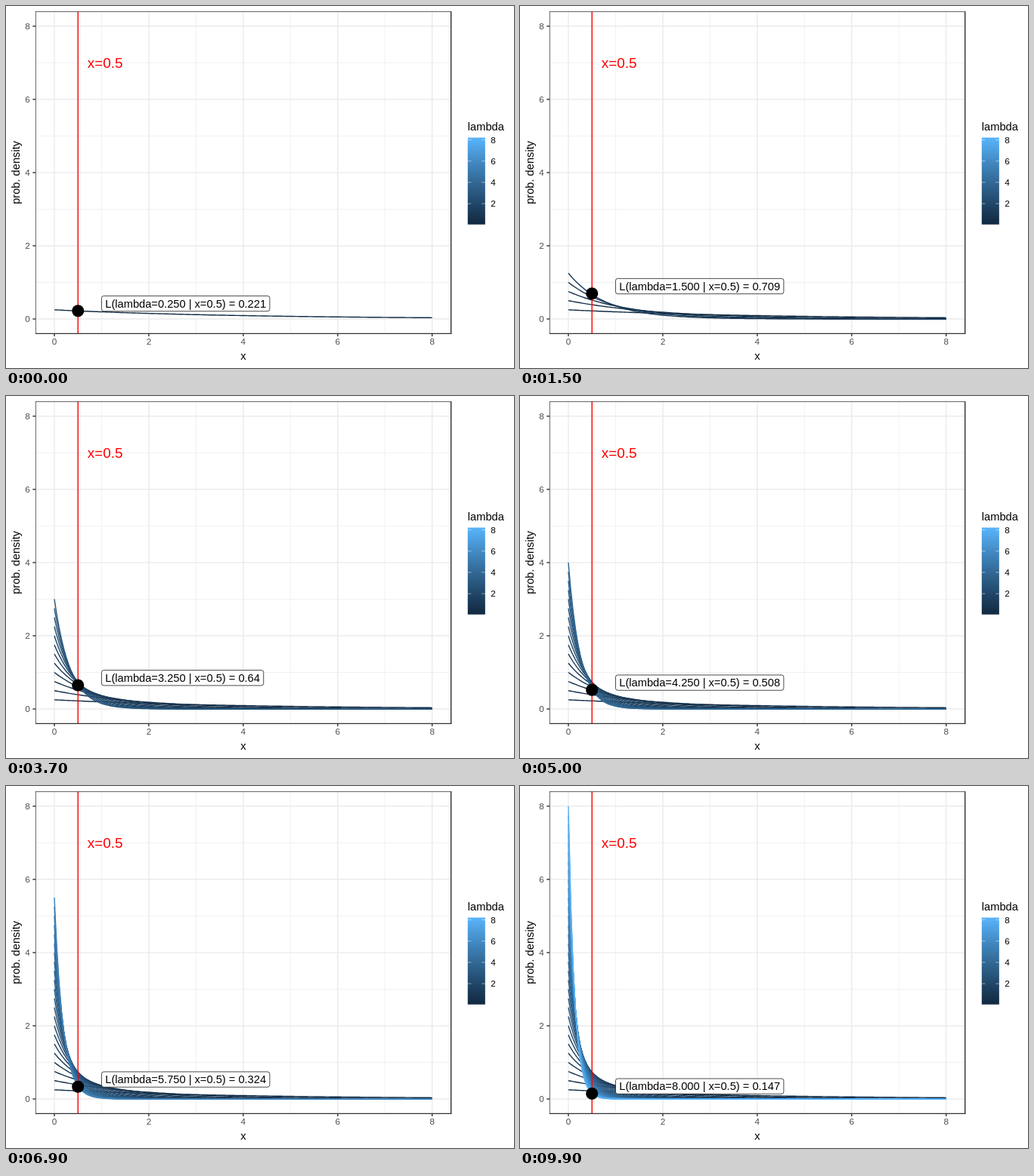
Animation of 672 by 480 pixels, one loop 10000 ms. Source, as an HTML page:

```html
<!DOCTYPE html>
<html>
<head>
<meta charset="utf-8">
<title>Exponential likelihood</title>
<style>
  html, body { margin: 0; width: 100%; height: 100%; overflow: hidden; background: #fff; }
  svg { display: block; }
  text { font-family: "Liberation Sans", Arial, sans-serif; font-size: 14.67px; white-space: pre; }
  .small { font-size: 11.73px; }
</style>
</head>
<body>
<svg id="stage" width="672" height="480" viewBox="0 0 672 480"></svg>
<script>
const stage = document.getElementById('stage');
const LEFT = 39, RIGHT = 588.7, TOP = 7.33, BOTTOM = 434.4;
const px = x => LEFT + (x + 0.4) * (RIGHT - LEFT) / 8.8;
const py = y => BOTTOM - (y + 0.4) * (BOTTOM - TOP) / 8.8;

function add(tag, attrs, parent = stage) {
  const el = document.createElementNS('http://www.w3.org/2000/svg', tag);
  for (const key in attrs) el.setAttribute(key, attrs[key]);
  parent.append(el);
  return el;
}
const line = (x1, y1, x2, y2, stroke, width = 1.42) =>
  add('line', { x1, y1, x2, y2, stroke, 'stroke-width': width });
function write(str, x, y, attrs = {}) {
  const el = add('text', { x, y, ...attrs });
  el.textContent = str;
  return el;
}

// Dark to light blue; the slight dip approximates a Lab blend.
function blue(t) {
  const from = [19, 43, 67], to = [86, 177, 247], dip = [2, 4, 5];
  return `rgb(${from.map((c, i) =>
    Math.round(c + (to[i] - c) * t - 4 * t * (1 - t) * dip[i]))})`;
}

// Grid
for (let v = 1; v < 8; v += 2) {
  line(px(v), TOP, px(v), BOTTOM, '#ebebeb', 0.71);
  line(LEFT, py(v), RIGHT, py(v), '#ebebeb', 0.71);
}
for (let v = 0; v <= 8; v += 2) {
  line(px(v), TOP, px(v), BOTTOM, '#ebebeb');
  line(LEFT, py(v), RIGHT, py(v), '#ebebeb');
}

// One density curve per rate
const STEPS = 31, FRAMES = 100;
const rates = Array.from({ length: STEPS + 1 }, (_, k) => 0.25 * (k + 1));
const starts = rates.map((_, k) => Math.round(k * (FRAMES - 1) / STEPS));
const density = (rate, x) => rate * Math.exp(-rate * x);
const curves = rates.map((rate, k) => {
  let d = '';
  for (let i = 0; i <= 160; i++) {
    const x = i / 20;
    d += `${i ? 'L' : 'M'}${px(x).toFixed(2)} ${py(density(rate, x)).toFixed(2)}`;
  }
  return add('path', { d, fill: 'none', stroke: blue(k / STEPS), 'stroke-width': 1.42 });
});

line(px(0.5), TOP, px(0.5), BOTTOM, '#f00');
const dot = add('circle', { cx: px(0.5), r: 8.05 });
write('x=0.5', px(0.7), 82, { fill: '#f00', style: 'font-size:18.9px' });

const tag = add('g', {});
const box = add('rect', { x: px(1), y: -10.15, height: 20.3, rx: 2.88,
  fill: '#fff', stroke: '#000', 'stroke-width': 0.71 }, tag);
const label = add('text', { x: px(1) + 4.8, y: 5.3 }, tag);

// Border, ticks and titles
line(LEFT, TOP + 0.2, RIGHT, TOP + 0.2, '#333', 0.75);
line(LEFT + 0.4, TOP, LEFT + 0.4, BOTTOM, '#333', 0.75);
line(RIGHT, 7, RIGHT, BOTTOM + 0.6, '#333');
line(LEFT, BOTTOM, RIGHT + 0.6, BOTTOM, '#333');
const axisText = { class: 'small', fill: '#4d4d4d' };
for (let v = 0; v <= 8; v += 2) {
  line(px(v), BOTTOM, px(v), BOTTOM + 3.67, '#333');
  line(LEFT - 3.67, py(v), LEFT, py(v), '#333');
  write(v, px(v), 449.2, { ...axisText, 'text-anchor': 'middle' });
  write(v, 31.9, py(v) + 4.2, { ...axisText, 'text-anchor': 'end' });
}
write('x', (LEFT + RIGHT) / 2, 469, { 'text-anchor': 'middle' });
write('prob. density', 0, 0, { 'text-anchor': 'middle', transform: 'translate(18 220.9) rotate(-90)' });

// Legend
const BAR = { x: 610.8, y: 174.5, width: 23.04, height: 115.2 };
const ramp = add('linearGradient', { id: 'ramp', x1: 0, y1: 1, x2: 0, y2: 0 });
for (let i = 0; i <= 10; i++)
  add('stop', { offset: 0.025 + 0.095 * i, 'stop-color': blue(i / 10) }, ramp);
write('lambda', BAR.x, 165);
add('rect', { ...BAR, fill: 'url(#ramp)' });
for (let v = 2; v <= 8; v += 2) {
  const y = BAR.y + BAR.height * (0.975 - 0.95 * (v - 0.25) / 7.75);
  const end = BAR.x + BAR.width;
  line(BAR.x, y, BAR.x + 4.6, y, '#fff', 0.5);
  line(end - 4.6, y, end, y, '#fff', 0.5);
  write(v, 641.2, y + 4.2, { class: 'small' });
}

let shown = -1;
function draw(frame) {
  curves.forEach((c, k) => c.style.display = starts[k] <= frame ? '' : 'none');
  const k = starts.filter(s => s <= frame).length - 1;
  const next = Math.min(k + 1, STEPS);
  const part = next > k ? (frame - starts[k]) / (starts[next] - starts[k]) : 0;
  const a = density(rates[k], 0.5), b = density(rates[next], 0.5);
  const y = a + (b - a) * part;
  dot.setAttribute('cy', py(y));
  tag.setAttribute('transform', `translate(0 ${py(y + 0.2)})`);
  const rate = rates[part < 0.5 ? k : next];
  label.textContent = `L(lambda=${rate.toFixed(3)} | x=0.5) = ${+density(rate, 0.5).toFixed(3)}`;
  box.setAttribute('width', label.getComputedTextLength() + 9.6);
}

const begin = performance.now();
function tick() {
  const frame = Math.floor((performance.now() - begin) / 100) % FRAMES;
  if (frame !== shown) draw(shown = frame);
  requestAnimationFrame(tick);
}
tick();
</script>
</body>
</html>
```
